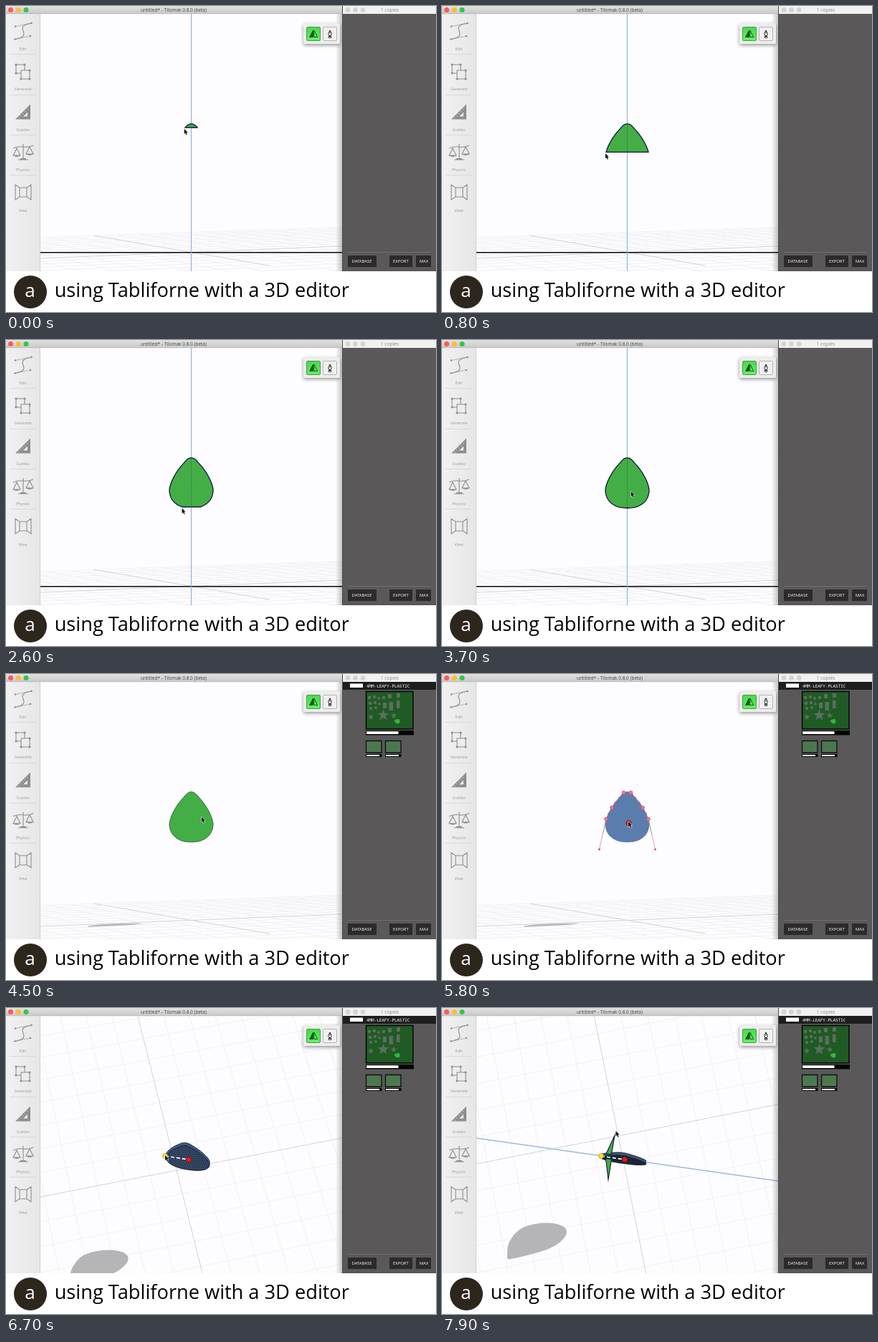
These frames come from a looping animation (600 px wide and 428 px high, 8 s). An HTML page with a canvas:

```html
<!DOCTYPE html>
<html lang="en">
<head>
<meta charset="utf-8">
<title>Sheet modelling demo</title>
<style>
html, body { margin: 0; width: 100%; height: 100%; overflow: hidden; background: #fff; }
canvas, svg { position: absolute; left: 0; top: 0; width: 600px; height: 428px; display: block; }
text { font-family: "Open Sans", "Noto Sans", sans-serif; }
.mono { font: 5.9px "DejaVu Sans Mono", monospace; fill: #fff; }
.label { font-size: 5.6px; fill: #999; text-anchor: middle; }
.icon { fill: none; stroke: #8e8e8e; stroke-width: 1.1; }
.scrap { fill: #5a6f5d; }
</style>
</head>
<body>
<canvas id="scene"></canvas>
<svg viewBox="0 0 600 428">
  <defs>
    <linearGradient id="bar" x2="0" y2="1"><stop stop-color="#e2e1e2"/><stop offset="1" stop-color="#c9c8c9"/></linearGradient>
    <linearGradient id="side"><stop stop-color="#f1f1f1"/><stop offset="1" stop-color="#e6e6e6"/></linearGradient>
    <linearGradient id="go" x2="0" y2="1"><stop stop-color="#49d74b"/><stop offset="1" stop-color="#62f263"/></linearGradient>
    <linearGradient id="shade"><stop stop-opacity="0"/><stop offset="1" stop-opacity=".22"/></linearGradient>
    <filter id="soft" x="-30%" y="-30%" width="160%" height="170%"><feGaussianBlur stdDeviation="2.5"/></filter>
    <path id="star" d="M0-8 2-2.6 8-2.4 3.3 1.2 5 7 0 3.6-5 7-3.3 1.2-8-2.4-2-2.6Z"/>
  </defs>

  <rect x="460" y="11" width="9" height="360" fill="url(#shade)"/>
  <rect y="11" width="48" height="360" fill="url(#side)"/>
  <path d="M47.500 11V371" stroke="#cfcfcf"/>
  <path d="M5 67.500H41M5 124.500H41M5 180.500H41M5 236.500H41" stroke="#d3d3d3" stroke-width=".8"/>
  <g class="icon">
    <path d="M35.500 24C6 29 42 41 12.500 46.500"/>
    <path d="M35.500 24 13 28.500M12.500 46.500 34 42" stroke-width=".6"/>
    <path d="M14 82H26V94H14Z"/>
    <path d="M21 90H33V102H21Z" fill="#ececec"/>
    <path d="M10 199Q17 196 24 197 31 198 38 195M24 193V213M17 215H31M15 199 10 209H20ZM33 197 28 207H38Z"/>
    <path d="M13 250V271L19 267V254ZM35 250V271L29 267V254ZM19 254H29M19 267H29"/>
  </g>
  <g fill="#8e8e8e">
    <circle cx="13" cy="28.500" r="1.300"/><circle cx="35.500" cy="24" r="1.300"/>
    <circle cx="12.500" cy="46.500" r="1.300"/><circle cx="34" cy="42" r="1.300"/>
    <circle cx="14" cy="82" r="1.6"/><circle cx="26" cy="82" r="1.6"/><circle cx="14" cy="94" r="1.6"/>
    <circle cx="33" cy="90" r="1.6"/><circle cx="21" cy="102" r="1.6"/><circle cx="33" cy="102" r="1.6"/>
    <path fill-rule="evenodd" d="M13 158.500 34 137.500V158.500ZM24 154.500H30V148.500Z"/>
    <path d="M10 209H20Q15 213 10 209M28 207H38Q33 211 28 207M20 213H28V215H20Z"/>
  </g>
  <path d="M17 156l1.500 1.500M20 153l1.500 1.500M23 150l1.500 1.500M26 147l1.500 1.500M29 144l1.500 1.500" stroke="#eee" stroke-width=".7"/>
  <g class="label">
    <text x="23.500" y="61.500">Edit</text><text x="23.500" y="118">Generate</text>
    <text x="23.500" y="174.500">Guides</text><text x="23.500" y="231">Physics</text><text x="23.500" y="287.500">View</text>
  </g>

  <rect width="469" height="11" fill="url(#bar)"/>
  <path d="M0 10.750H469" stroke="#b4b3b4" stroke-width=".6"/>
  <circle cx="6.500" cy="5.500" r="3.500" fill="#fb5a54"/>
  <circle cx="17.300" cy="5.500" r="3.500" fill="#fcbc33"/>
  <circle cx="28" cy="5.500" r="3.500" fill="#33c648"/>
  <text x="234" y="8" font-size="6.5" text-anchor="middle" fill="#444">untitled* - Tilomak 0.8.0 (beta)</text>

  <rect x="415" y="26" width="51" height="29" rx="2" fill="#000" opacity=".4" filter="url(#soft)"/>
  <rect x="415" y="24" width="51" height="29" rx="1.500" fill="#ededed"/>
  <rect x="419.500" y="29.500" width="19" height="19" rx="1.500" fill="url(#go)" stroke="#4a9b4b"/>
  <rect x="442.500" y="29.500" width="19" height="19" rx="1.500" fill="#f0f0f0" stroke="#b5b5b5"/>
  <path d="M428.500 34V43.500H423.500Z" fill="#1d5a20" stroke="#17461a" stroke-width=".8"/>
  <path d="M429.800 34V43.500H434.800Z" fill="none" stroke="#17461a" stroke-width=".9"/>
  <path d="M452 34 454.300 38.500 453.300 41.500H450.700L449.700 38.500ZM450.300 42.500H453.700V44.300H450.300Z" fill="#fff" stroke="#222"/>
  <path d="M452 34V39" stroke="#222" stroke-width=".9"/>

  <rect x="469" width="131" height="371" fill="#5a5859"/>
  <rect x="469" width="131" height="11" fill="#f2f1f2"/>
  <path d="M469.500 0V371" stroke="#4a494a"/>
  <g fill="#d5d4d5"><circle cx="477" cy="5.500" r="3.500"/><circle cx="487.500" cy="5.500" r="3.500"/><circle cx="498" cy="5.500" r="3.500"/></g>
  <text x="535.500" y="8" font-size="6.7" text-anchor="middle" fill="#888">1 copies</text>
  <path d="M477 344.500H593" stroke="#716f70"/>
  <path d="M477 349h40v16h-40zM535 349h32v16h-32zM572 349h21v16h-21z" fill="#2c2a2b"/>
  <g class="mono"><text x="482.500" y="359.200">DATABASE</text><text x="540" y="359.200">EXPORT</text><text x="577" y="359.200">MAX</text></g>

  <g id="stock" visibility="hidden">
    <rect x="470" y="11" width="130" height="11" fill="#1f1e1f"/>
    <rect x="480" y="13.500" width="18" height="5.500" fill="#fff"/>
    <text class="mono" x="503" y="18.800">4MM-LEAFY-PLASTIC</text>
    <rect x="502.500" y="24.500" width="65.500" height="52.500" fill="#205a24" stroke="#050805" stroke-width="1.500"/>
    <g class="scrap">
      <use href="#star" x="526.500" y="57.500"/>
      <use href="#star" transform="translate(509 60) scale(.55)"/>
      <use href="#star" transform="translate(541 58) scale(.55)"/>
      <circle cx="507" cy="33" r="2.400"/><circle cx="514" cy="32" r="2.200"/><circle cx="520" cy="34" r="2"/>
      <circle cx="508" cy="41" r="2.400"/><circle cx="515" cy="40" r="2.200"/><circle cx="509" cy="48" r="2.200"/>
      <circle cx="516" cy="47" r="2"/><circle cx="521" cy="42" r="1.800"/>
      <path d="M526 40h5v8h-5zM534.500 39h5.500v12h-5.500zM533 28h5v6h-5zM545 27h5v6h-5zM545 37h4.500v11h-4.500zM525 31h4v4h-4z"/>
    </g>
    <path d="M541.500 65.500Q544 62.500 548 63 550.500 65 549 68.500 545.500 70.500 543.500 68Z" fill="#35b63b"/>
    <path d="M502 79h67v6.500h-67zM502 112h22.500v4h-22.500zM529 112h22.500v4h-22.500z" fill="#050505"/>
    <path d="M503 80.300h44.500v3.800h-44.500zM503 113h18v2h-18zM530 113h18v2h-18z" fill="#fff"/>
    <path d="M502.500 93.500h21.500v16.500h-21.500zM529.500 93.500h21.500v16.500h-21.500z" fill="#4c7850" stroke="#0b120b" stroke-width="1.300"/>
    <path class="scrap" d="M506 98h3v3h-3zM532 99l3-2 2 2-3 2z"/>
  </g>

  <rect y="371" width="600" height="57" fill="#fff"/>
  <circle cx="34" cy="400" r="23" fill="#2d261d"/>
  <text x="33.500" y="407" font-size="26" text-anchor="middle" fill="#fff">a</text>
  <text x="67.700" y="407" font-size="27.2" fill="#000">using Tabliforne with a 3D editor</text>
</svg>
<script>
const LOOP = 8000, STEP = 100;
const canvas = document.getElementById('scene');
const stock = document.getElementById('stock');
const ratio = Math.max(1, window.devicePixelRatio || 1);
canvas.width = 600 * ratio;
canvas.height = 428 * ratio;
const c = canvas.getContext('2d');
c.scale(ratio, ratio);

const MID = 258.5;
const EDGE = [[MID, 164.8], [254, 166.2], [250, 170], [240, 182], [232, 196], [228.2, 208],
  [228.8, 216], [231.5, 222.8], [237, 228.8], [246, 233.5], [MID, 235]];
const BLOB = [[-41, 18], [-40, 2], [-22, -21], [18, -27], [42, -20], [42, -6], [22, 10], [-12, 20], [-36, 25], [-41, 26]];

// Poses of the view: front, tilted, seen from above
// Camera: tilt, spin, pan x, pan y
const CAMERA = [[0.4, 0, 0, 0], [60, 13.5, -20.5, -36], [82, 14.7, -12.5, -32]];
const PIECE = [[1, 0, 0, 1, MID, 200, 0], [1, .14, .06, .48, 253, 209.5, 4], [1.04, .14, .03, .16, 253, 212, 4]];
const SHADOW = [[.92, -.03, 0, .06, 152, 351], [.98, 0, 0, .95, 129.5, 362.5], [1, 0, 0, 1, 132, 326]];
const FACE = [[91, 125, 174], [52, 70, 98], [29, 39, 56]];
const BACK = [[91, 125, 174], [64, 91, 130], [60, 84, 118]];

const clamp = x => Math.min(1, Math.max(0, x));
const mix = (a, b, k) => a + (b - a) * k;
const mixAll = (a, b, k) => a.map((v, i) => mix(v, b[i], k));
const ease = x => x * x * (3 - 2 * x);
const span = (t, from, to) => clamp((t - from) / (to - from));
const pose = (keys, p) => p <= 1 ? mixAll(keys[0], keys[1], p) : mixAll(keys[1], keys[2], p - 1);
const rgb = v => `rgb(${v.map(Math.round)})`;

function track(keys, t) {
  let i = 1;
  while (i < keys.length - 1 && keys[i][0] < t) i++;
  const [a, b] = [keys[i - 1], keys[i]];
  return mixAll(a.slice(1), b.slice(1), span(t, a[0], b[0]));
}

// Catmull-Rom point on the left edge
function edgeAt(s) {
  const n = EDGE.length - 1, i = Math.min(n - 1, Math.floor(s)), u = s - i;
  const get = k => k < 0 ? [2 * MID - EDGE[1][0], EDGE[1][1]]
    : k > n ? [2 * MID - EDGE[n - 1][0], EDGE[n - 1][1]] : EDGE[k];
  const [p, q, r, w] = [get(i - 1), get(i), get(i + 1), get(i + 2)];
  return [0, 1].map(d => q[d] + u / 2 * (r[d] - p[d]
    + u * (2 * p[d] - 5 * q[d] + 4 * r[d] - w[d] + u * (3 * (q[d] - r[d]) + w[d] - p[d]))));
}

function leaf(end) {
  const left = [];
  for (let s = 0; s < end; s += .125) left.push(edgeAt(s));
  left.push(edgeAt(end));
  return left.concat(left.map(([x, y]) => [2 * MID - x, y]).reverse());
}

function trace(points, closed = true) {
  c.beginPath();
  points.forEach(([x, y]) => c.lineTo(x, y));
  if (closed) c.closePath();
}

function stroke(color, width, dash = []) {
  c.strokeStyle = color;
  c.lineWidth = width;
  c.setLineDash(dash);
  c.stroke();
  c.setLineDash([]);
}

function line(a, b, color, width, dash) {
  trace([a, b], false);
  stroke(color, width, dash);
}

function fill(points, color, edge, width = 1) {
  trace(points);
  c.fillStyle = color;
  c.fill();
  if (edge) stroke(edge, width);
}

function dot([x, y], r, color, edge) {
  c.beginPath();
  c.arc(x, y, r, 0, 7);
  c.fillStyle = color;
  c.fill();
  if (edge) stroke(edge, .8);
}

function floor(p) {
  const [tiltDeg, spinDeg, panX, panY] = pose(CAMERA, p);
  const tilt = tiltDeg * Math.PI / 180, axis = (64 + spinDeg) * Math.PI / 180;
  const dist = 2000, drop = 153.5;
  const at = (a, b) => {
    const x = a * Math.cos(axis) + b * Math.sin(axis);
    const w = a * Math.sin(axis) - b * Math.cos(axis);
    const y = w * Math.sin(tilt) + drop * Math.cos(tilt);
    const z = w * Math.cos(tilt) - drop * Math.sin(tilt);
    const k = dist / (dist - z);
    return [MID + panX + x * k, 191 + panY + y * k];
  };
  for (let k = -520; k <= 520; k += 40) {
    if (!k) continue;
    line(at(-360, k), at(400, k), '#efeef2', .8);
    if (k >= -360 && k <= 400) line(at(k, -520), at(k, 520), '#efeef2', .8);
  }
  line(at(-360, 0), at(225, 0), '#cfced2', .9);
  line(at(0, -520), at(0, 520), '#cfced2', .9);
}

function shadow(p) {
  const [a, b, e, d, x, y] = pose(SHADOW, p);
  const pts = BLOB.map(([u, v]) => [x + a * u + e * v, y + b * u + d * v]);
  const half = (m, n) => [(m[0] + n[0]) / 2, (m[1] + n[1]) / 2];
  c.beginPath();
  c.moveTo(...half(pts[pts.length - 1], pts[0]));
  pts.forEach((q, i) => c.quadraticCurveTo(...q, ...half(q, pts[(i + 1) % pts.length])));
  c.fillStyle = '#b5b4b6';
  c.fill();
}

function piece(p) {
  const [a, b, e, d, x, y, deep] = pose(PIECE, p);
  const front = leaf(10).map(([u, v]) => [x + a * (u - MID) + e * (v - 200), y + b * (u - MID) + d * (v - 200)]);
  const edge = p > .05 ? '#131c2b' : '#4d6c98';
  if (deep > .1) {
    for (let k = deep; k > 0; k -= 1) {
      fill(front.map(([u, v]) => [u, v - k]), rgb(pose(BACK, p)), k === deep ? edge : null);
    }
  }
  fill(front, rgb(pose(FACE, p)), edge, p > .05 ? 1 : .7);
  if (p < .5) return;
  c.save();
  trace(front);
  c.clip();
  c.fillStyle = 'rgba(8,16,32,.5)';
  for (let v = 186; v < 232; v += 3) {
    for (let u = 218 + v % 2 * 1.5; u < 290; u += 3) c.fillRect(u, v, 1.1, 1.1);
  }
  c.restore();
}

function handles() {
  const both = f => [1, -1].forEach(s => f((x, y) => [MID + s * (x - MID), y]));
  both(at => {
    line(at(229, 203), at(224, 225), '#8d8d95', .9);
    line(at(224, 225), at(219.5, 245), '#ef8ba2', .9);
    for (let s = 1.2; s < 5; s += .55) dot(at(...edgeAt(s)), 1.1, '#d84568');
    [[253.5, 166], [236.8, 187], [229, 203]].forEach(q => dot(at(...q), 2.4, '#f7768f', '#d95073'));
    dot(at(219.5, 245.3), 1.4, '#e33c65');
  });
}

function blade(g) {
  const wing = (a, tip, b) => fill([a, mixAll(a, tip, g), mixAll(a, b, g)], '#3fae45', '#0d1d33', 1.1);
  wing([229, 204], [241, 178], [236.5, 204.5]);
  wing([228.5, 210.5], [232, 240], [236.5, 211.5]);
}

function cursor([x, y]) {
  const shape = [[0, 0], [0, 7.2], [1.6, 5.8], [2.8, 8.5], [4.1, 7.9], [2.9, 5.3], [5, 5.1]];
  c.lineJoin = 'round';
  trace(shape.map(([u, v]) => [x + u, y + v]));
  stroke('rgba(255,255,255,.8)', 1.2);
  c.fillStyle = '#111';
  c.fill();
  c.lineJoin = 'miter';
}

function draw(t) {
  const drawing = t < 4200;
  const p = ease(span(t, 6000, 6500)) + ease(span(t, 7000, 7500));
  const reach = track([[0, 2], [1500, 7], [2600, 9], [2800, 9.1]], t)[0];
  stock.setAttribute('visibility', t >= 4300 ? 'visible' : 'hidden');

  c.save();
  c.fillStyle = '#fdfcfe';
  c.fillRect(0, 0, 600, 428);
  c.beginPath();
  c.rect(48, 11, 421, 360);
  c.clip();
  floor(p);

  if (drawing) {
    line([48, 344.7], [469, 344.7], '#0a0a0a', 1.6);
    line([MID, 11], [MID, 371], '#8cb0dd', 1.1);
    const shape = leaf(t < 3400 ? reach : 10);
    fill(shape, '#43ae46', '#0c1c34', 1.3);
    line([MID, 166], [MID, shape[(shape.length >> 1) - 1][1]], '#2b7c46', .9, [2, 1]);
  } else {
    shadow(p);
    if (t < 5200) {
      fill(leaf(10), '#43ae46', '#2a5a30', .9);
    } else {
      if (t >= 7000) line([48, 182], [469, 242], '#9db9e2', 1.3);
      piece(p);
    }
  }

  if (t >= 5200 && t < 6000) handles();
  const red = mixAll([260.5, 208.5], [255, 212], clamp(p));
  if (t > 7500) blade(span(t, 7500, 7900));
  if (t >= 6400) {
    const pull = mixAll(red, [222, 207], span(t, 6350, 6650));
    line(pull, red, '#fff', 1.6, [5, 3]);
    dot(pull, 3.5, '#ffe21f', '#b39a12');
  }
  if (t >= 5500) dot(red, 3.6, '#ee1515', '#8a1010');

  if (t <= 3300) {
    const [x, y] = edgeAt(reach);
    cursor([x - 1.5 + reach / 9, y + 1.8]);
  } else {
    cursor(track([[3300, 245.5, 235.4], [3900, 273, 200], [5100, 273, 200], [5500, 260, 206.5],
      [6350, 260, 206.5], [6650, 222, 206], [7300, 222, 206], [7500, 229, 206], [7900, 242.5, 172]], t));
  }
  c.restore();
}

function tick(now) {
  draw(Math.floor(now % LOOP / STEP) * STEP);
  requestAnimationFrame(tick);
}
draw(0);
requestAnimationFrame(tick);
</script>
</body>
</html>
```
